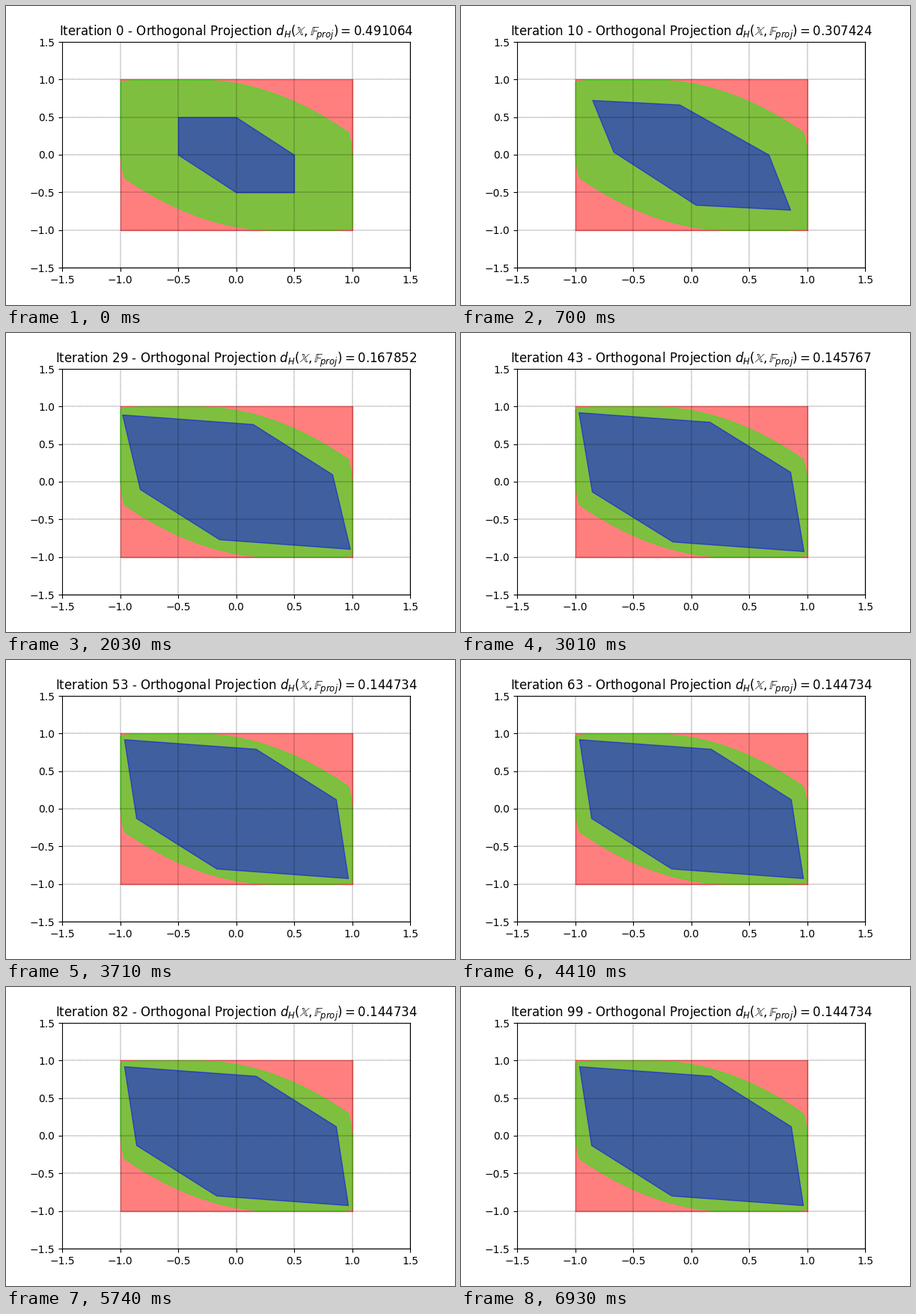
Recreate the animation shown at these times as a matplotlib script. Size 600 by 400 pixels, loop 7 s.

```python
import numpy as np
import matplotlib.pyplot as plt
from matplotlib.animation import FuncAnimation
from matplotlib.collections import PatchCollection
from matplotlib.patches import Polygon

STEPS = 100
INTERVAL = 70

# Iterations at which the inner set and its distance are known
KEYS = np.array([0, 10, 29, 43, 52])
DISTANCE = np.array([0.491064, 0.307424, 0.167852, 0.145767, 0.144734])


def mirrored(half):
    """Complete a centrally symmetric polygon from one half."""
    half = np.array(half)
    return np.vstack([half, -half])


HEXAGONS = np.array([
    mirrored([(-0.5, 0.5), (0, 0.5), (0.5, 0)]),
    [(-0.852, 0.727), (-0.1, 0.667), (0.668, 0.002),
     (0.855, -0.732), (0.04, -0.666), (-0.67, 0.04)],
    mirrored([(-0.982, 0.893), (0.145, 0.766), (0.829, 0.099)]),
    mirrored([(-0.970, 0.923), (0.160, 0.796), (0.855, 0.131)]),
    mirrored([(-0.965, 0.923), (0.170, 0.796), (0.861, 0.125)]),
])


def monotone_curve(keys, values):
    """Shape-preserving cubic interpolation that holds its last value."""
    h = np.diff(keys).reshape((-1,) + (1,) * (values.ndim - 1))
    secant = np.diff(values, axis=0) / h
    slope = np.zeros_like(values)
    slope[0] = secant[0]
    a, b = secant[:-1], secant[1:]
    same = a * b > 0
    slope[1:-1] = np.where(same, 2 * a * b / np.where(same, a + b, 1), 0)

    def at(t):
        if t >= keys[-1]:
            return values[-1]
        i = np.searchsorted(keys, t, side="right") - 1
        w = keys[i + 1] - keys[i]
        s = (t - keys[i]) / w
        return ((1 + 2 * s) * (1 - s) ** 2 * values[i]
                + s * s * (3 - 2 * s) * values[i + 1]
                + w * s * (1 - s) ** 2 * slope[i]
                + w * s * s * (s - 1) * slope[i + 1])

    return at


def outer_set():
    """Rounded feasible set: flat sides joined by a parabolic arc."""
    x = np.linspace(-0.35, 0.965, 24)
    arc = np.column_stack([x, 1 - 0.405 * (x + 0.35) ** 2])
    corner = [(-1, 0.965), (-0.97, 0.982), (-0.85, 1)]
    side = [(0.988, 0.15), (1, 0)]
    return mirrored(np.vstack([corner, arc, side]))


def add_region(ax, points, color):
    region = PatchCollection([Polygon(points)], color=color, alpha=0.5)
    ax.add_collection(region)
    return region


hexagon_at = monotone_curve(KEYS, HEXAGONS)
distance_at = monotone_curve(KEYS, DISTANCE)

fig, ax = plt.subplots(figsize=(6, 4), dpi=100)
fig.subplots_adjust(left=0.125, right=0.9, bottom=0.125, top=0.88)

add_region(ax, mirrored([(-1, 1), (1, 1)]), (1, 0, 0))
add_region(ax, outer_set(), (0, 1, 0))
inner = add_region(ax, HEXAGONS[0], (0, 0, 1))

ticks = np.arange(-1.5, 1.6, 0.5)
ax.set(xlim=(-1.5, 1.5), ylim=(-1.5, 1.5), xticks=ticks, yticks=ticks)
ax.grid(color=(0, 0, 0), linestyle="--", linewidth=0.3)
title = ax.set_title("")


def update(step):
    inner.set_paths([Polygon(hexagon_at(step))])
    title.set_text(
        f"Iteration {step} - Orthogonal Projection "
        r"$d_H(\mathbb{X},\mathbb{F}_{proj})=$"
        f"${distance_at(step):.6f}$"
    )
    return inner, title


anim = FuncAnimation(fig, update, frames=STEPS, interval=INTERVAL,
                     repeat=True, repeat_delay=0)
plt.show()
```
